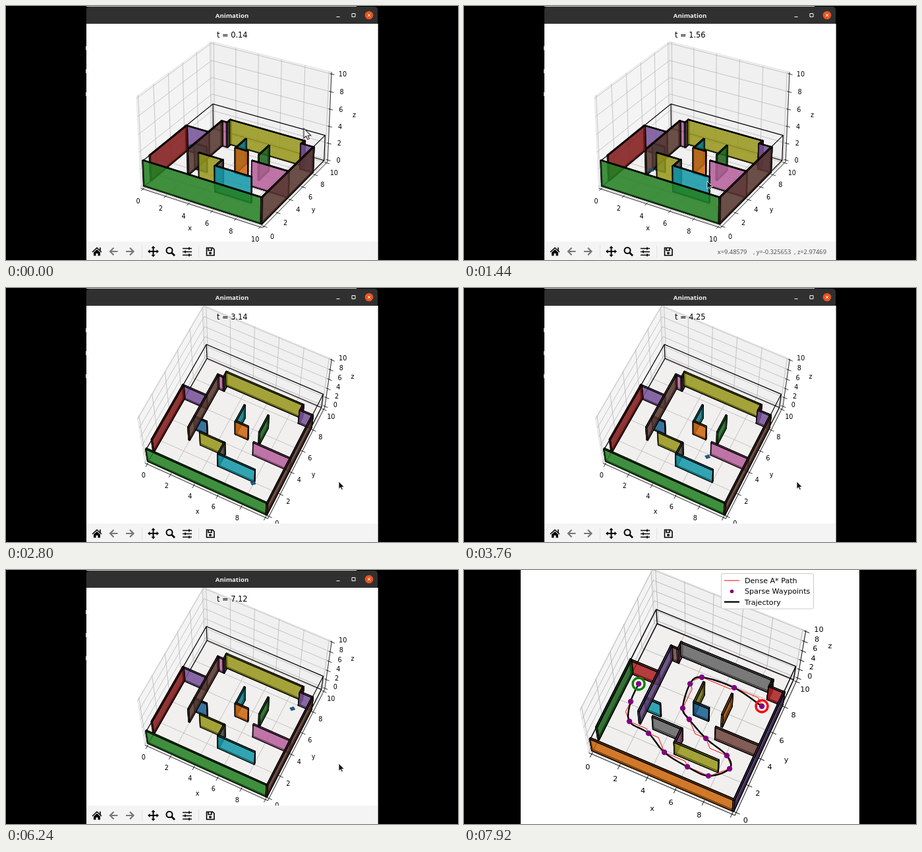
Animation of 686x386 px, one loop 8000 ms. Source, as an HTML page:

```html
<!DOCTYPE html>
<html lang="en">
<head>
<meta charset="utf-8">
<title>Maze flight</title>
<style>
html, body { margin: 0; width: 100%; height: 100%; overflow: hidden; background: #000; }
svg { display: block; width: 686px; height: 386px; }
text { font-family: "DejaVu Sans", sans-serif; white-space: pre; }
.ui { font-family: "Open Sans", "Noto Sans", sans-serif; }
.line { fill: none; stroke: #000; }
</style>
</head>
<body>
<svg viewBox="0 0 686 386" xmlns="http://www.w3.org/2000/svg">
  <defs>
    <path id="back" d="M7 0H-4M1-5.500L-4.500 0 1 5.500"/>
    <path id="prong" d="M-1 0V-5H-3L0-8.500 3-5H1V0Z"/>
    <path id="slider" d="M-7 0H7M3-2V2"/>
  </defs>
  <rect width="686" height="386" fill="#fff"/>
  <g id="plot"></g>
  <g id="window">
    <path d="M0 0H122V386H0ZM564 0H686V386H564Z"/>
    <path d="M121 64h2M121 99h2M121 134h2" stroke="#ddd" stroke-width="6"/>
    <path d="M564.500 27V386" stroke="#aaa"/>
    <rect x="122" width="442" height="8"/>
    <path d="M122 .5H532" stroke="#ccc"/>
    <path d="M122 27V6q0-5 5-5H559q5 0 5 5V27Z" fill="#303030"/>
    <text class="ui" x="343" y="18" font-size="9.6" font-weight="700" fill="#f4f4f4" text-anchor="middle">Animation</text>
    <circle cx="551" cy="14" r="6.3" fill="#e95420"/>
    <path d="M549 12l4 4m0-4l-4 4M501.500 16.500h5M525 11.500h5v5h-5z" fill="none" stroke="#fff"/>
    <rect x="122" y="358" width="442" height="28" fill="#f5f4f4"/>
    <path d="M206.500 364v18M292.500 364v18" stroke="#e3e2e1"/>
    <path d="M131 374l7-6.500 7 6.500M143 367v5" class="line" stroke-width="1.600"/>
    <path d="M133 374.500l5-4.500 5 4.500v5h-3.500V376h-3v3.500H133z"/>
    <g fill="none" stroke="#777" stroke-width="2.200">
      <use href="#back" x="162.500" y="373"/>
      <use href="#back" transform="translate(189 373) scale(-1 1)"/>
    </g>
    <g transform="translate(223.500 373)">
      <use href="#prong"/><use href="#prong" transform="rotate(90)"/>
      <use href="#prong" transform="rotate(180)"/><use href="#prong" transform="rotate(270)"/>
    </g>
    <g class="line" stroke-width="2">
      <circle cx="248" cy="371.500" r="4.500"/>
      <path d="M251.500 375l4.500 4.500" stroke-width="2.800"/>
    </g>
    <g class="line" stroke-width="1.600">
      <use href="#slider" x="275" y="368.500"/>
      <use href="#slider" transform="translate(275 373.500) scale(-1 1)"/>
      <use href="#slider" x="275" y="378.500"/>
      <path d="M304.500 367.500h9l2.500 2.500v9h-11.500zM307 368v3.500h5V368"/>
      <circle cx="310" cy="375.500" r="1.200"/>
    </g>
    <text id="clock" x="320" y="47.500" font-size="11.400"></text>
    <text id="status" class="ui" x="550" y="376.500" font-size="9.300" fill="#444" text-anchor="end"></text>
    <path id="cursor" d="M0 0V11.500L2.700 9 4.500 13 6.400 12 4.700 8.500H8.300Z" stroke-width=".8"/>
  </g>
  <g id="summary">
    <path d="M0 0H86V386H0ZM600 0H686V386H600Z"/>
    <g id="route"></g>
    <rect x="390.500" y="5.500" width="140" height="53.500" rx="2.500" fill="#fff" fill-opacity=".9" stroke="#ccc"/>
    <path d="M395 16h23" stroke="red"/>
    <circle cx="406.500" cy="32.500" r="2.800" fill="purple"/>
    <path d="M395 48.500h23" stroke="#000" stroke-width="2.300"/>
    <g font-size="11.100">
      <text x="426" y="20">Dense A* Path</text>
      <text x="426" y="36">Sparse Waypoints</text>
      <text x="426" y="52.500">Trajectory</text>
    </g>
  </g>
</svg>
<script>
const LOOP = 8000, STEP = 80, DRAG_START = 1480, SUMMARY_AT = 6720;
const LO = -0.2083, HI = 10.2083, HEIGHT = 3, HALF = 0.055, FLIGHT_Z = 1.5;
const PALETTE = '1f77b4 ff7f0e 2ca02c d62728 9467bd 8c564b e377c2 7f7f7f bcbd22 17becf'.split(' ');

// Floor plan as pen moves; every stroke is one wall and takes the next palette colour
const PLAN = 'M0 0 h10 M0 .9 v5.1 h2 M2 3 v5 h.5 v.5 h6.5 M5 5 v1.5 M2 4 h1 M5 5 h1 ' +
  'M7 5 v1.5 M9 8.5 v-.5 h1 v-8 M7 4 h3 M5 3 v-1 M3 3 h2 M5 2 h3';
const WAYPOINTS = [
  [.96, 5.09], [1.02, 3.74], [1.53, 2.45], [3.01, 2.21], [4.49, 1.44], [6.25, 1.15],
  [7.73, 1.14], [8.77, 2.14], [8.25, 2.89], [6.54, 3.41], [5.02, 4.17], [4.31, 4.71],
  [4.04, 6.47], [4.55, 7.22], [6.79, 7.41], [8.96, 6.95]
];
const LAST = WAYPOINTS.length - 1;

const $ = id => document.getElementById(id);
const ramp = (t, from, to) => Math.max(0, Math.min(1, (t - from) / (to - from)));

function readPlan(plan) {
  const walls = [];
  let x = 0, y = 0;
  for (const [, op, a, b] of plan.matchAll(/([Mhv])(-?[\d.]+)(?: ([\d.]+))?/g)) {
    const nx = op === 'M' ? +a : op === 'h' ? x + +a : x;
    const ny = op === 'M' ? +b : op === 'v' ? y + +a : y;
    if (op !== 'M') {
      walls.push({
        x0: Math.min(x, nx), x1: Math.max(x, nx), y0: Math.min(y, ny), y1: Math.max(y, ny),
        color: walls.length + 2
      });
    }
    [x, y] = [nx, ny];
  }
  return walls;
}
const WALLS = readPlan(PLAN);

// Perspective camera; returns a mapping from data to [x, y, depth]
function camera({ azim, elev, scale, cx, cy }) {
  const a = azim * Math.PI / 180, e = elev * Math.PI / 180;
  const sa = Math.sin(a), ca = Math.cos(a), se = Math.sin(e), ce = Math.cos(e);
  return (x, y, z) => {
    const X = (x - 5) * .1097, Y = (y - 5) * .1097, Z = (z - 5) * .0823;
    const depth = ce * ca * X + ce * sa * Y + se * Z;
    const f = scale / (10 - depth);
    return [cx + f * (ca * Y - sa * X), cy - f * (ce * Z - se * ca * X - se * sa * Y), depth];
  };
}

const pathOf = points => 'M' + points.map(p => p[0].toFixed(1) + ',' + p[1].toFixed(1)).join('L');
const shaded = (color, k) => {
  const n = parseInt(PALETTE[color % PALETTE.length], 16);
  return `rgb(${[n >> 16, n >> 8 & 255, n & 255].map(c => Math.round(c * k))})`;
};

// The six sides of a wall: each axis held at its low and high end, shaded by direction
function wallMarkup(P, wall, shift) {
  const ends = [[wall.x0 - HALF, wall.x1 + HALF], [wall.y0 - HALF, wall.y1 + HALF], [0, HEIGHT]];
  const faces = [];
  [.6, .8, .5].forEach((shade, axis) => {
    for (const side of [0, 1]) {
      const pts = [[0, 0], [1, 0], [1, 1], [0, 1]].map(([u, v]) => {
        const p = [];
        p[axis] = ends[axis][side];
        p[(axis + 1) % 3] = ends[(axis + 1) % 3][u];
        p[(axis + 2) % 3] = ends[(axis + 2) % 3][v];
        return P(...p);
      });
      faces.push({ shade, pts, depth: pts.reduce((sum, p) => sum + p[2], 0) });
    }
  });
  return faces.sort((a, b) => a.depth - b.depth)
    .map(f => `<path d="${pathOf(f.pts)}Z" fill="${shaded(wall.color + shift, f.shade)}"/>`).join('');
}

function axesMarkup(P, s) {
  const size = 9.6 * s;
  const line = (...pts) => pathOf(pts.map(p => P(...p)));
  const pane = (fill, ...pts) => `<path d="${line(...pts)}Z" fill="${fill}" stroke="#e2e2e2"/>`;
  const label = (text, p, drop = 0) => {
    const [x, y] = P(...p);
    return `<text x="${x.toFixed(1)}" y="${(y + size * .37 + drop).toFixed(1)}">${text}</text>`;
  };
  let grid = '', axes = '', labels = '', cage = '';
  for (let v = 0; v <= 10; v += 2) {
    grid += line([v, LO, LO], [v, HI, LO], [v, HI, HI]) +
      line([HI, v, LO], [LO, v, LO], [LO, v, HI]) + line([LO, LO, v], [LO, HI, v], [HI, HI, v]);
    axes += line([v, LO - .25, LO], [v, LO + .12, LO]) +
      line([HI - .12, v, LO], [HI + .25, v, LO]) + line([HI - .12, HI, v], [HI + .25, HI, v]);
    labels += label(v, [v, LO - .7, LO - .88]) + label(v, [HI + .68, v, LO - .88]) +
      label(v, [HI + .62, HI + .62, v], 2.5 * s);
  }
  axes += line([LO, LO, LO], [HI, LO, LO], [HI, HI, LO], [HI, HI, HI]);
  labels += label('x', [5, LO - 1.45, LO - 1.3]) + label('y', [HI + 1.45, 5, LO - 1.3]) +
    label('z', [HI + 1.4, HI + 1.4, 5]);
  const corners = [[0, 0], [10, 0], [10, 10], [0, 10]];
  for (const z of [0, HEIGHT]) cage += line(...corners.map(c => [...c, z])) + 'Z';
  for (const c of corners) cage += line([...c, 0], [...c, HEIGHT]);
  return pane('#f4f4f4', [LO, LO, LO], [LO, HI, LO], [LO, HI, HI], [LO, LO, HI]) +
    pane('#f0f0f0', [LO, HI, LO], [HI, HI, LO], [HI, HI, HI], [LO, HI, HI]) +
    pane('#f1f0ef', [LO, LO, LO], [HI, LO, LO], [HI, HI, LO], [LO, HI, LO]) +
    `<g fill="none"><path d="${grid}" stroke="#b4b4b4" stroke-width="${.75 * s}"/>` +
    `<path d="${axes}" stroke="#000" stroke-width="${.8 * s}"/>` +
    `<path d="${cage}" stroke="#000" stroke-width="${1.2 * s}"/></g>` +
    `<g text-anchor="middle" font-size="${size}">${labels}</g>`;
}

function droneMarkup([x, y]) {
  const rotors = [0, 1, 2, 3].map(i => {
    const angle = i * Math.PI / 2 + .4;
    return `<ellipse cx="${(x + 2.4 * Math.cos(angle)).toFixed(1)}" cy="${(y + 1.7 * Math.sin(angle)).toFixed(1)}" rx="1.6" ry="1.2"/>`;
  });
  return `<g fill="#1f6aa0" fill-opacity="1" stroke="#0e3a5a" stroke-width=".8">${rotors.join('')}</g>`;
}

// Walls are painted in the order of their nearest corner
function sceneMarkup(view, shift, drone) {
  const P = camera(view), s = view.scale / 1855;
  const items = WALLS.map(w => ({
    depth: P(w.x1, w.y0, FLIGHT_Z)[2],
    svg: wallMarkup(P, w, shift)
  }));
  if (drone) {
    const spot = P(...drone, FLIGHT_Z);
    items.push({ depth: spot[2], svg: droneMarkup(spot) });
  }
  items.sort((a, b) => a.depth - b.depth);
  return axesMarkup(P, s) +
    `<g stroke="#000" stroke-width="${1.15 * s}" stroke-linejoin="round" fill-opacity=".62">` +
    items.map(i => i.svg).join('') + '</g>';
}

// Catmull-Rom curve through the waypoints
function flightPoint(u) {
  const i = Math.min(Math.floor(u), LAST - 1), f = u - i;
  const [a, b, c, d] = [-1, 0, 1, 2].map(k => WAYPOINTS[Math.max(0, Math.min(LAST, i + k))]);
  return [0, 1].map(k => b[k] + f / 2 * (c[k] - a[k] +
    f * (2 * a[k] - 5 * b[k] + 4 * c[k] - d[k] + f * (3 * (b[k] - c[k]) + d[k] - a[k]))));
}

// Grid search moves: straight along the longer axis, then diagonal into the next waypoint
function densePath() {
  return WAYPOINTS.flatMap(([x, y], i) => {
    if (i === LAST) return [[x, y]];
    const dx = WAYPOINTS[i + 1][0] - x, dy = WAYPOINTS[i + 1][1] - y;
    const diagonal = Math.min(Math.abs(dx), Math.abs(dy));
    return [[x, y], [x + dx - Math.sign(dx) * diagonal, y + dy - Math.sign(dy) * diagonal]];
  });
}

const SUMMARY_VIEW = { azim: -65.8, elev: 68, scale: 2179, cx: 349.4, cy: 187.5 };
const summaryScene = sceneMarkup(SUMMARY_VIEW, -1 + PALETTE.length);

function routeMarkup() {
  const P = camera(SUMMARY_VIEW), at = p => P(...p, FLIGHT_Z);
  const curve = Array.from({ length: LAST * 8 + 1 }, (_, i) => at(flightPoint(i / 8)));
  const stops = WAYPOINTS.map(at);
  const circle = (p, r, style) => `<circle cx="${p[0]}" cy="${p[1]}" r="${r}" ${style}/>`;
  const ring = (p, color) => circle(p, 9, `fill="none" stroke="${color}" stroke-width="3.4"`);
  return `<path d="${pathOf(densePath().map(at))}" fill="none" stroke="red"/>` +
    `<path d="${pathOf(curve)}" fill="none" stroke="#000" stroke-width="2.4"/>` +
    stops.map(p => circle(p, 4.2, 'fill="purple"')).join('') +
    ring(stops[0], 'green') + ring(stops[LAST], 'red');
}
$('route').innerHTML = routeMarkup();

function render(t) {
  const done = t >= SUMMARY_AT;
  $('window').style.display = done ? 'none' : '';
  $('summary').style.display = done ? '' : 'none';
  if (done) {
    $('plot').innerHTML = summaryScene;
    return;
  }
  const approach = ramp(t, 0, 1200), drag = ramp(t, DRAG_START, 1880), leave = ramp(t, 2080, 2560);
  const clock = .14 + 1.42 * ramp(t, 0, 1440) + 5.75 * ramp(t, 1440, 6400);
  const progress = Math.max(0, Math.min(LAST, 2.15 * clock - .4));
  const view = { azim: -60 - 4 * drag, elev: 30 + 33.5 * drag, scale: 1855, cx: 348.8, cy: 189 };
  $('plot').innerHTML = sceneMarkup(view, 0, flightPoint(progress));
  $('clock').textContent = 't = ' + clock.toFixed(2);

  const mx = 452 - 83 * approach + 17 * drag + 119 * leave;
  const my = 186 + 80 * approach + 63 * drag - 35 * leave;
  const started = t >= STEP;
  const x = 9.48579 + (mx - 369) * .0051, y = -.325653 - (my - 266) * .043;
  $('status').textContent = started && t <= DRAG_START
    ? `x=${x.toFixed(5)}    , y=${y.toFixed(6)}  , z=2.97469` : '';
  const cursor = $('cursor');
  cursor.setAttribute('transform', `translate(${mx} ${my}) scale(${started ? 1 : 1.3})`);
  cursor.setAttribute('fill', started ? '#111' : '#f4f4f4');
  cursor.setAttribute('stroke', started ? '#fff' : '#222');
}

const start = performance.now();
let shown = -1;
function tick() {
  const t = Math.floor((performance.now() - start) % LOOP / STEP) * STEP;
  if (t !== shown) render(shown = t);
  requestAnimationFrame(tick);
}
tick();
</script>
</body>
</html>
```
